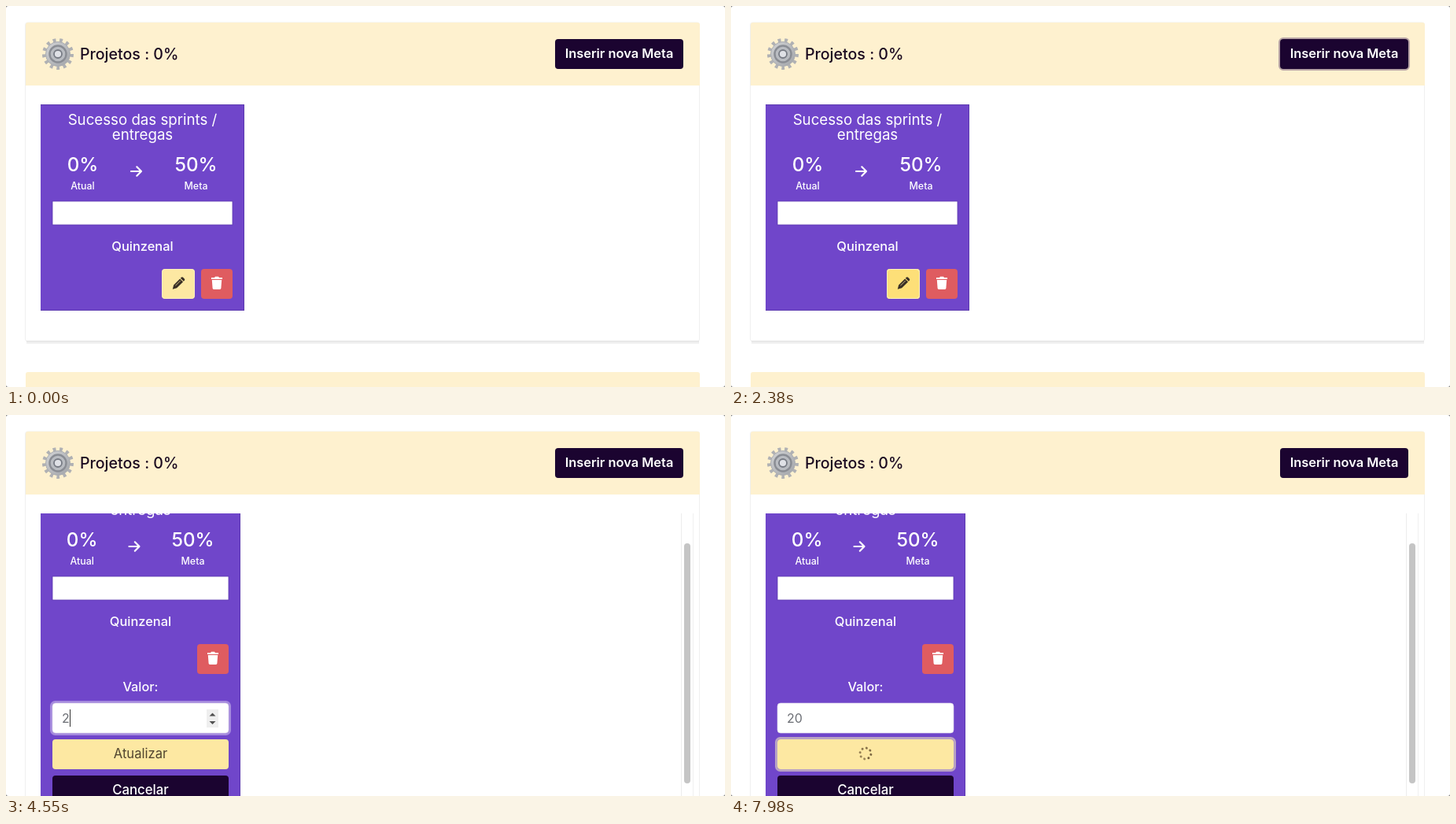
Recreate the animation shown at these times as an HTML page. Size 914 px wide and 484 px high, loop 8000 ms.

```html
<!DOCTYPE html>
<html lang="pt-BR">
<head>
<meta charset="utf-8">
<title>Projetos</title>
<style>
  html, body { margin: 0; width: 100%; height: 100%; overflow: hidden; background: #fff; }
  svg { display: block; width: 100%; height: 100%; font-family: Inter, "Open Sans", sans-serif; }
</style>
</head>
<body>
<svg id="stage" viewBox="0 0 914 484">
  <defs>
    <clipPath id="body"><rect x="26" y="125" width="854" height="359"/></clipPath>
    <linearGradient id="metal" x1="0" y1="0" x2="1" y2="1">
      <stop offset="0" stop-color="#d3d4d6"/><stop offset="1" stop-color="#a0a3a8"/>
    </linearGradient>
  </defs>
  <g id="panel"></g>
  <g id="content" clip-path="url(#body)"></g>
  <path d="M0 0h3Q0 0 0 3zM914 0h-3q3 0 3 3zM0 484h3q-3 0-3-3zM914 484h-3q3 0 3-3z" fill="#777"/>
</svg>
<script>
const LOOP = 8000;
const PURPLE = '#7046ca', EDGE = '#5c3ab0', DARK = '#1b0430';
const CREAM = '#fef1cf', YELLOW = '#fde8a2', HOVER = '#fddf78';

// Times of the user's actions, in ms
const FOCUS_NEW = 1540, HOVER_EDIT = 2170, OPEN = 2660, SCROLL = 2900, FOCUS_INPUT = 4060,
      TYPE_2 = 4340, TYPE_0 = 4760, HOVER_UPDATE = 5700, SUBMIT = 6700;

const ramp = (t, start, length = 150) => Math.min(1, Math.max(0, (t - start) / length));
const ease = p => p * p * (3 - 2 * p);

const rect = (x, y, w, h, fill, r = 0, extra = '') =>
  `<rect x="${x}" y="${y}" width="${w}" height="${h}" rx="${r}" fill="${fill}" ${extra}/>`;
const ring = (x, y, w, h, color, opacity, width = 2) =>
  rect(x - width / 2, y - width / 2, w + width, h + width, 'none', 5,
    `stroke="${color}" stroke-width="${width}" opacity="${opacity}"`);
const text = (x, y, size, str, { fill = '#fff', weight = 400, anchor = 'middle' } = {}) =>
  `<text x="${x}" y="${y}" font-size="${size}" fill="${fill}" font-weight="${weight}" text-anchor="${anchor}">${str}</text>`;

const gear = `<g transform="translate(66 61)" fill="none">
  <circle r="17.5" stroke="#b0b1b4" stroke-width="5" pathLength="26" stroke-dasharray=".9 1.1"/>
  <circle r="15.5" fill="url(#metal)" stroke="#acaeb1"/>
  <circle r="10.5" fill="#b9bcc1" stroke="#8a8d94" stroke-width="2.4"/>
  <circle r="5" fill="#dfe1e6" stroke="#777b84" stroke-width="1.8"/></g>`;

const pencil = (x, y) => `<g transform="translate(${x} ${y}) rotate(45)" fill="#392f25">
  <path d="M-2.8-5.8h5.6V5.5L0 10.2-2.8 5.5zM-2.8-6.8v-1.4q0-1.6 1.6-1.6h2.4q1.6 0 1.6 1.6v1.4z"/>
  <path d="M-.6-4.5V4.5" stroke="${YELLOW}" stroke-width=".7"/></g>`;

const trash = (x, y) => `<path transform="translate(${x} ${y})" fill="#fff"
  d="M-7-7h4l1-1.2h4L3-7h4v2H-7zM-6.2-4H6.2L5.4 6.6Q5.3 8 3.9 8H-3.9Q-5.3 8-5.4 6.6z"/>`;

const arrow = (x, y) => `<path transform="translate(${x} ${y})" d="M-6.5 0H6.5M.8-5.7 6.5 0 .8 5.7"
  fill="none" stroke="#fff" stroke-width="2.2" stroke-linecap="round" stroke-linejoin="round"/>`;

function spinner(x, y, t) {
  let dots = '';
  for (let i = 0; i < 8; i++) {
    const a = i * Math.PI / 4;
    dots += `<circle cx="${7 * Math.cos(a)}" cy="${7 * Math.sin(a)}" r="1.5" opacity="${.65 + i * .04}"/>`;
  }
  return `<g transform="translate(${x} ${y}) rotate(${(t - SUBMIT) * .36})" fill="#6b5534">${dots}</g>`;
}

function panel(t) {
  const open = t >= OPEN;
  const focus = ramp(t, FOCUS_NEW) - ramp(t, OPEN);
  const sides = open ? 470 : 405;
  return rect(24.5, 21, 857, sides, '#fff', 3, 'stroke="#efefef"')
    + (open ? '' : rect(26, 425, 855, 2, '#e8e8e8') + rect(26, 427, 855, 2, '#f0f0f0')
      + rect(25, 465, 857, 30, CREAM, 3))
    + `<path d="M25 101V24q0-3 3-3H879q3 0 3 3V101z" fill="${CREAM}"/>`
    + gear
    + text(94, 68, 19.6, 'Projetos : 0%', { fill: '#1b0a20', weight: 500, anchor: 'start' })
    + ring(698, 42, 163, 38, '#b7a3a5', focus)
    + rect(698, 42, 163, 38, DARK, 4)
    + text(779.5, 66, 16.4, 'Inserir nova Meta', { weight: 600 });
}

function form(t, c, w) {
  const focus = ramp(t, FOCUS_INPUT) - ramp(t, SUBMIT);
  const typed = t < TYPE_2 ? '' : t < TYPE_0 ? '2' : '20';
  const lastKey = t < TYPE_2 ? FOCUS_INPUT : t < TYPE_0 ? TYPE_2 : TYPE_0;
  const sent = t >= SUBMIT;
  const caret = !sent && t >= FOCUS_INPUT && (t - lastKey) % 1000 < 500;
  const hover = ramp(t, HOVER_UPDATE) - ramp(t, SUBMIT);
  const steps = rect(255, 417, 15, 23, '#efefef')
    + '<path d="M258.5 425.5l4-4 4 4zM258.5 432l4 4 4-4z" fill="#505050"/>';
  return text(c, 394, 16.3, 'Valor:', { weight: 500 })
    + ring(59, 409, w, 38, '#a58ade', focus, 3)
    + rect(59, 409, w, 38, '#fff', 4, 'stroke="#d9d2e8" stroke-width=".6"')
    + text(71, 434, 16, typed, { fill: '#6c6f75', anchor: 'start' })
    + (caret ? rect(71 + typed.length * 10, 417, 1, 22, '#333') : '')
    + (sent ? '' : steps)
    + ring(59, 455, w, 38, '#b9a2c4', ramp(t, SUBMIT), 3)
    + rect(59, 455, w, 38, YELLOW, 4)
    + rect(59, 455, w, 38, HOVER, 4, `opacity="${hover}"`)
    + (sent ? spinner(c, 473, t) : text(c, 479, 16.6, 'Atualizar', { fill: '#51452f' }))
    + rect(59, 501, w, 38, DARK, 4)
    + text(c, 525, 16.8, 'Cancelar', { weight: 500 });
}

function content(t) {
  const open = t >= OPEN;
  const width = open ? 254 : 259;
  const inner = width - 30;
  const c = 44 + width / 2;
  const right = 59 + inner;
  const left = c - inner * .332, goal = c + inner * .297;
  const scroll = 43 * ease(ramp(t, SCROLL, 500));
  const hover = ramp(t, HOVER_EDIT);

  const card = rect(44, 125, width, open ? 440 : 262, EDGE)
    + rect(44, 126, width - 1, open ? 438 : 260, PURPLE)
    + text(c, 151, 18.7, 'Sucesso das sprints /')
    + text(c, 170, 18.7, 'entregas')
    + text(left, 210, 24.2, '0%', { weight: 500 })
    + text(goal, 210, 24.2, '50%', { weight: 500 })
    + arrow(c - 8, 210)
    + text(left, 233, 12.4, 'Atual', { weight: 500 })
    + text(goal, 233, 12.4, 'Meta', { weight: 500 })
    + rect(59, 248, inner, 30, '#fff', 0, `stroke="${EDGE}" stroke-width=".8"`)
    + text(c, 311, 16.4, 'Quinzenal', { weight: 500 })
    + rect(right - 40, 334, 40, 38, '#df5c60', 4)
    + trash(right - 20, 352);

  const edit = rect(198, 334, 42, 38, YELLOW, 4)
    + rect(198, 334, 42, 38, HOVER, 4, `opacity="${hover}"`)
    + rect(198.5, 334.5, 41, 37, 'none', 4, 'stroke="#fff0bd"')
    + pencil(219, 352.5);

  const scrollbar = rect(858, 125, 1, 360, '#ececec') + rect(873, 125, 1, 360, '#f0f0f0')
    + rect(862, 127 + scroll * 36 / 43, 8, 305, '#c5c5c5', 4);

  return `<g transform="translate(0 ${-scroll})">${card}${open ? form(t, c, inner) : edit}</g>`
    + (open ? scrollbar : '');
}

const layers = { panel, content };
const drawn = {};
const startTime = performance.now();

function frame() {
  const t = (performance.now() - startTime) % LOOP;
  for (const id in layers) {
    const markup = layers[id](t);
    if (markup !== drawn[id]) document.getElementById(id).innerHTML = drawn[id] = markup;
  }
  requestAnimationFrame(frame);
}
frame();
</script>
</body>
</html>
```
